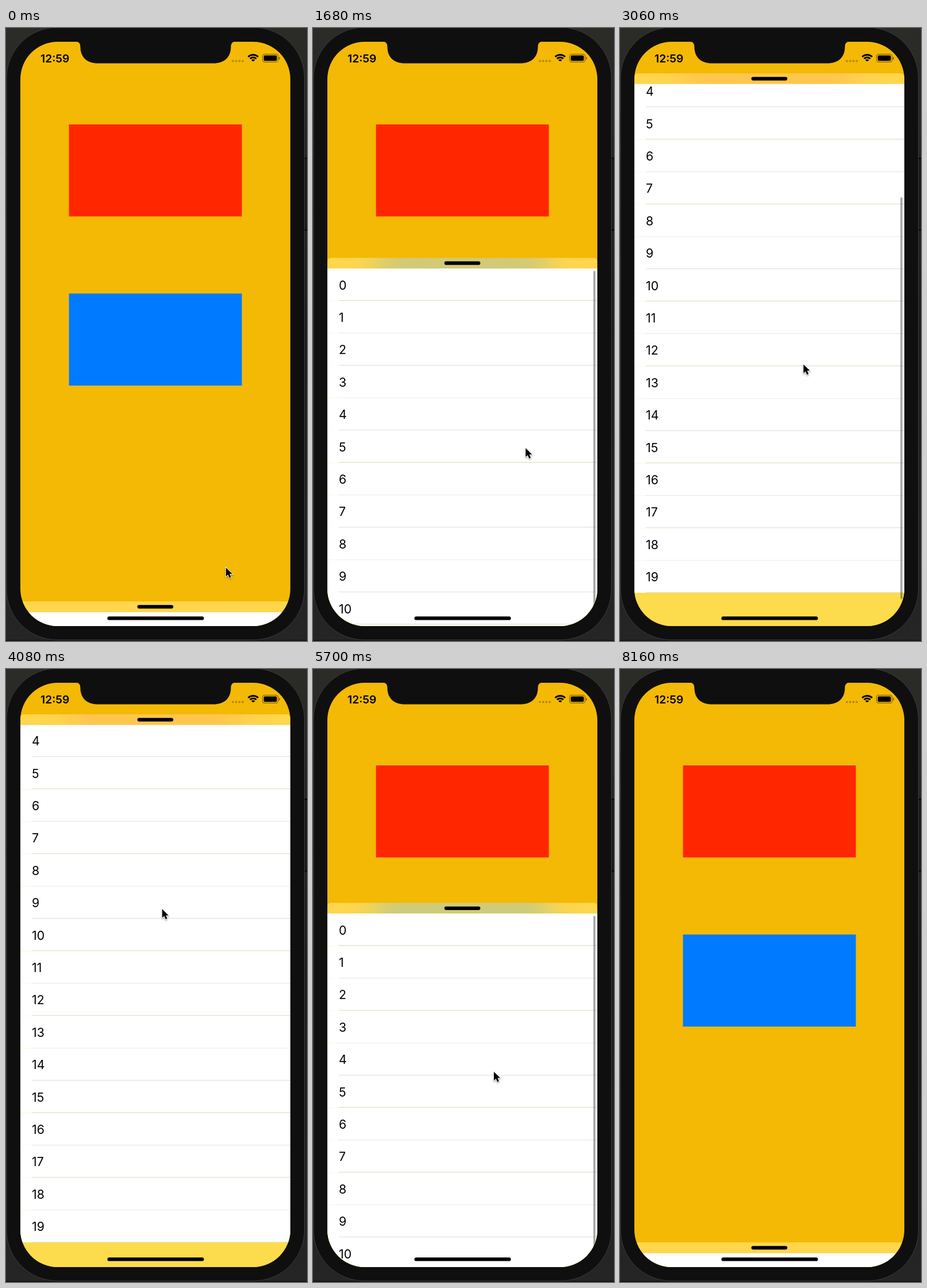
Write an HTML page with a canvas that moves like this. It is 524 by 1068 pixels and loops after 8220 ms.

```html
<!DOCTYPE html>
<html lang="en">
<head>
<meta charset="utf-8">
<title>Sliding panel</title>
<style>
html, body { margin: 0; width: 100%; height: 100%; overflow: hidden; background: #222; }
canvas { display: block; }
</style>
</head>
<body>
<canvas id="stage" width="524" height="1068"></canvas>
<script>
const c = document.getElementById('stage').getContext('2d');
const LOOP = 8220, STEP = 60, SETTLE = 350;
const ROW = 56.4, ROWS = 20, HEAD = 18.5, LIST = 901.5;
const MAX_SCROLL = ROW * ROWS - LIST;
const TOP = 79, MID = 538.5, LOW = 999;
const ARROW = new Path2D('M.5 1v18l4.2-3.8 2.9 6.8 3.3-1.4L8 13.9h5.6z');

// Each drag moves the sheet or scrolls the list, then settles at rest
const drags = [
  { start: 360, end: 900, from: [380, 1008], to: [375, 600], moves: 'sheet', rest: MID },
  { start: 1440, end: 2100, from: [372, 868.5], to: [363, 409], moves: 'sheet', rest: TOP },
  { start: 2520, end: 3060, from: [340, 850], to: [318.5, 584.5], moves: 'scroll', rest: MAX_SCROLL },
  { start: 4140, end: 4560, from: [270.5, 415], to: [285, 642], moves: 'scroll', rest: 0 },
  { start: 5280, end: 5700, from: [295.5, 371.5], to: [314, 700], moves: 'sheet', rest: MID },
  { start: 6630, end: 7573, from: [354, 845.5], to: [360, 1086], moves: 'sheet', rest: LOW }
];

const clamp = v => Math.min(1, Math.max(0, v));
const mix = (a, b, u) => a + (b - a) * u;
const ease = (t, a, b) => {
  const u = clamp((t - a) / (b - a));
  return u * u * (3 - 2 * u);
};
const soft = (d, width) => 1 / (1 + Math.exp(-1.7 * d / width));

function stateAt(t) {
  const s = { sheet: LOW, scroll: 0, bar: 0, x: 382, y: 938.5 };
  let idle = 0;
  for (const d of drags) {
    const reach = ease(t, idle, d.start), pull = ease(t, d.start, d.end);
    s.x = mix(mix(s.x, d.from[0], reach), d.to[0], pull);
    s.y = mix(mix(s.y, d.from[1], reach), d.to[1], pull);
    if (t < d.start) break;

    const shift = (d.to[1] - d.from[1]) * pull;
    let value = d.moves === 'sheet' ? s.sheet + shift : s.scroll - shift;
    if (d.moves === 'scroll' && value > MAX_SCROLL) value = mix(MAX_SCROLL, value, .385);
    s[d.moves] = mix(value, d.rest, ease(t, d.end, d.end + SETTLE));
    if (d !== drags[0])
      s.bar = ease(t, d.start, d.start + 120) * (1 - ease(t, d.end + SETTLE, d.end + 2 * SETTLE));
    idle = d.end;
  }
  return s;
}

function rect(x, y, w, h, color) {
  c.fillStyle = color;
  c.fillRect(x, y, w, h);
}

function pill(x, y, w, h, r, color) {
  c.fillStyle = color;
  c.beginPath();
  c.roundRect(x, y, w, h, r);
  c.fill();
}

function phone() {
  const g = c.createLinearGradient(0, 0, 0, 1068);
  g.addColorStop(0, '#2b2c28');
  g.addColorStop(.5, '#1d1d1d');
  g.addColorStop(1, '#252525');
  rect(0, 0, 524, 1068, g);
  rect(0, 1066, 524, 2, '#1c1216');
  for (const [x, y, h] of [[0, 149, 42], [0, 227, 76], [0, 314, 75], [519, 227, 125]]) {
    rect(x, y - 1, 5, h + 2, '#000');
    rect(x, y + 1, 5, h - 2, '#1b1b1b');
  }
  pill(1, -1, 518.5, 1067, 88, '#0f0f0f');
  c.strokeStyle = '#3c3c3c';
  c.lineWidth = 1;
  c.stroke();
}

function statusBar() {
  c.fillStyle = '#0f0f0f';
  c.fill(new Path2D(`M119 23C127 24 129.5 26 129.5 34C130 52 142 61.5 160 61.5
    H361C379 61.5 391 52 391.5 34C391.5 26 394 24 402 23z`));

  c.fillStyle = '#000';
  c.font = '600 19.3px Inter, sans-serif';
  c.fillText('12:59', 60, 59.5);
  for (let i = 0; i < 4; i++) pill(393 + i * 5.7, 55.5, 4, 4, 2, 'rgba(0,0,0,.25)');

  // Wi-Fi fan
  c.strokeStyle = '#000';
  c.lineWidth = 3;
  for (const r of [12.3, 7.7, 3]) {
    c.beginPath();
    c.arc(430.3, 59, r, -Math.PI * .75, -Math.PI * .25);
    c.stroke();
  }

  c.strokeStyle = 'rgba(0,0,0,.45)';
  c.lineWidth = 1.2;
  c.beginPath();
  c.roundRect(446.6, 45.6, 27, 13.8, 3.6);
  c.stroke();
  pill(448.7, 47.7, 22.8, 9.6, 2, '#000');
  pill(475.2, 50.5, 1.6, 4.5, 1, 'rgba(0,0,0,.5)');
}

// Frosted strip: tint taken from the blurred blocks behind it
function headFill(y) {
  const mid = y + HEAD / 2;
  const weight = (a, b, v, width) => soft(v - a, width) * soft(b - v, width);
  const g = c.createLinearGradient(25, 0, 495, 0);
  for (let i = 0; i <= 24; i++) {
    const k = weight(110, 410, mix(25, 495, i / 24), 24);
    const r = k * weight(168, 328, mid, 75), b = k * weight(462, 623, mid, 75);
    const green = 214 - 114 * r - 66 * b + 100 * b * (1 - b);
    g.addColorStop(i / 24, `rgb(${255 - 189 * b},${green},${76 + 10 * r + 174 * b})`);
  }
  return g;
}

function sheet(t, { sheet: y, scroll, bar }) {
  const top = y + HEAD;
  rect(25, top, 470, 1000, '#fcdc4c');
  pill(25, y, 470, HEAD, [6, 6, 0, 0], headFill(y));
  pill(228.7, y + 6.2, 62.6, 6.2, 3.1, '#000');

  c.save();
  c.beginPath();
  c.rect(25, top, 470, LIST);
  c.clip();
  c.font = '400 21.3px Inter, sans-serif';
  for (let i = 0; i < ROWS; i++) {
    const ry = top - scroll + i * ROW;
    const pressed = i === 3 && t >= 5160 ? 1 - ease(t, 5320, 5440) : 0;
    rect(25, ry, 470, ROW, '#fff');
    rect(25, ry, 470, ROW, `rgba(213,213,213,${pressed})`);
    rect(45, Math.round(ry + ROW) - 1, 450, 1, '#dedede');
    c.fillStyle = '#000';
    c.fillText(i, 45, ry + 36.6);
  }

  const over = Math.max(0, scroll - MAX_SCROLL), len = 715 - over;
  const pos = mix(4, LIST - 4 - len, clamp(scroll / MAX_SCROLL));
  pill(488.2, top + pos, 3.4, len, 1.7, `rgba(0,0,0,${.36 * bar})`);
  c.restore();
}

function cursor({ x, y }) {
  c.save();
  c.translate(x + .5, y + .8);
  c.scale(.85, .85);
  c.shadowColor = 'rgba(0,0,0,.4)';
  c.shadowBlur = 3;
  c.shadowOffsetY = 1.5;
  c.strokeStyle = '#fff';
  c.lineWidth = 2;
  c.stroke(ARROW);
  c.shadowColor = 'transparent';
  c.fillStyle = '#000';
  c.fill(ARROW);
  c.restore();
}

function draw(now) {
  const t = Math.floor(now % LOOP / STEP) * STEP;
  const state = stateAt(t);
  phone();
  c.save();
  c.beginPath();
  c.roundRect(25, 24, 470, 1018, 65);
  c.clip();
  rect(25, 24, 470, 1018, '#f4b904');
  rect(109.6, 168, 301, 160.3, '#ff2600');
  rect(109.6, 462.6, 301, 160.4, '#007bff');
  sheet(t, state);
  statusBar();
  pill(176.5, 1025.2, 168, 6.4, 3.2, '#000');
  c.restore();
  cursor(state);
}

const start = performance.now();
function loop() {
  draw(performance.now() - start);
  requestAnimationFrame(loop);
}
loop();
</script>
</body>
</html>
```
